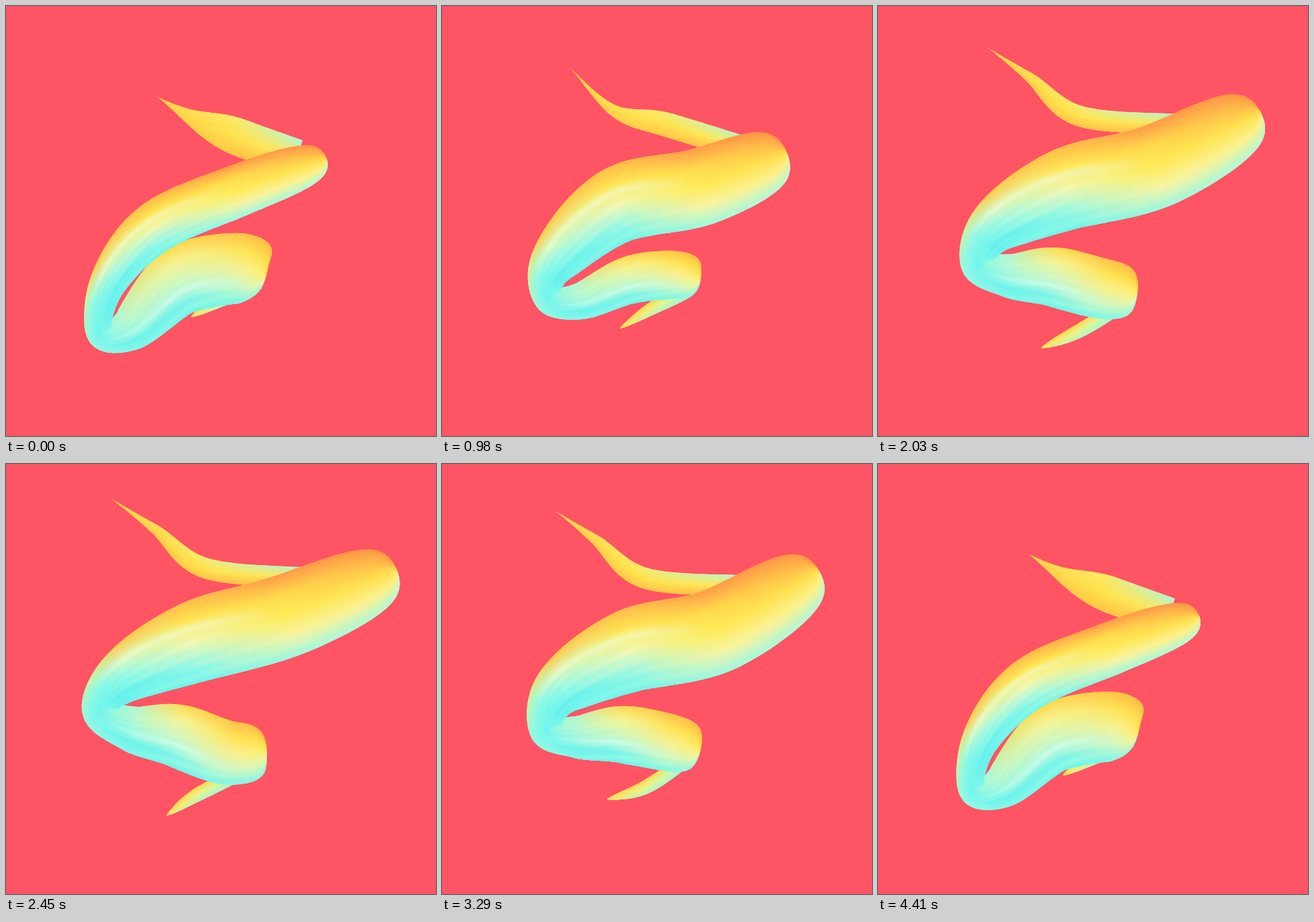
These frames come from a looping animation (600 px wide and 600 px high, 4.48 s). An HTML page with a canvas:

```html
<!DOCTYPE html>
<html lang="en">
<head>
<meta charset="utf-8">
<title>Paint ribbon</title>
<style>
html, body { margin: 0; width: 100%; height: 100%; overflow: hidden; background: #ff5464; }
canvas { display: block; width: 600px; height: 600px; }
</style>
</head>
<body>
<canvas id="stage" width="600" height="600"></canvas>
<script>
const ctx = document.getElementById('stage').getContext('2d');
const LOOP = 4480, STEP = 70, NU = 72, NV = 28;

// Time in ms -> position along the four poses
const TIMING = [[0, 0], [980, 1], [1610, 2], [2870, 3], [2940, 3],
  [3360, 1.92], [3640, 1.06], [4410, .03], [4480, 0]];

// Spine points x,y. The band runs from the blade's end round the bend
// (middle point) to the body's end. wide: half widths of blade and body.
const POSES = [
  { band: [363,376, 322,366, 243,384, 172,452, 130,456, 143,385, 208,309, 325,257, 447,212],
    upper: [210,126, 262,157, 322,182, 405,212], lower: [258,434, 300,410, 355,388], wide: [50, 37] },
  { band: [361,380, 320,375, 260,383, 192,412, 148,407, 158,355, 245,278, 362,252, 481,204],
    upper: [178,85, 240,146, 315,166, 425,200], lower: [248,450, 300,418, 350,396], wide: [34, 55] },
  { band: [360,399, 312,385, 250,377, 190,383, 147,375, 165,318, 262,263, 385,235, 522,148],
    upper: [158,67, 215,108, 285,162, 430,172], lower: [231,464, 287,449, 350,405], wide: [40, 60] },
  { band: [366,402, 305,411, 232,380, 168,363, 122,328, 163,286, 264,241, 400,198, 556,145],
    upper: [137,36, 205,83, 275,137, 410,152], lower: [220,504, 260,466, 345,432], wide: [48, 58] }
];

const mix = (a, b, k) => a + (b - a) * k;
const blend = (a, b, k) => a.map((n, i) => mix(n, b[i], k));
const rgb = hex => [0, 2, 4].map(i => parseInt(hex.slice(i, i + 2), 16));
const smooth = x => { const t = Math.min(1, x); return t * t * (3 - 2 * t); };

// A limb swells away from the bend and closes with a round cap
const limb = (u, full, pose) =>
  mix(18 + 2.3 * pose, full, smooth(u / .6)) * Math.sqrt(Math.max(0, 1 - u ** 12));

// Colour stops: [u, colours from the upper edge to the lower one]
// Glints: [u from, u to, v from, v to, width, strength, colour]
const ribbons = [
  { spine: 'upper', from: 0, to: 1,
    width: (u, p) => (14 + 12 * Math.exp(-1.4 * p)) * smooth(u / .7),
    stops: [
      [0, 'ffd24c ffd24c ffd24c'],
      [.6, 'ffea66 ffe24e ffc846'],
      [1, 'a8f6dc ffe860 ffb846']],
    glints: [] },
  { spine: 'lower', from: 0, to: 1,
    width: u => 10 * Math.sin(Math.PI * .8 * u),
    stops: [
      [0, 'ffdc54 ffe25a ffe868'],
      [.5, 'ffd850 e8f68c b4f8c4'],
      [1, 'ffe668 b8f8c8 94f7dc']],
    glints: [] },
  { spine: 'band', from: .5, to: 0,
    width: (u, p, wide) => limb(u, wide[0], p),
    stops: [
      [0, '8cf8e6 80f8ea 70f4ec 84f8ea 9cf8e0'],
      [.25, 'b0f8d0 b8f8d0 a0f8e0 78f6ea 7cf7ea'],
      [.5, 'ffdc50 f4f498 d0f8c0 a4f9e2 74f6ea'],
      [.8, 'ffc048 ffe452 faf090 d4f8c0 80f7e8'],
      [1, 'ffb848 ffdc4c ffee68 e8f6a8 94f8e0']],
    glints: [
      [.1, .8, .55, .7, .05, .6, 'd8fdf4'],
      [.05, .7, .78, .82, .05, .5, '5cecf0']] },
  { spine: 'band', from: .49, to: 1,
    width: (u, p, wide) => limb(u, wide[1], p),
    stops: [
      [0, '9cf8e0 84f8ea 70f4ec 80f8ea 8cf8e6'],
      [.18, 'd0f49c 94f9e6 7cf7ea 70f3ec 66f0ec'],
      [.3, 'ffcc4a d8f8c0 a0f9e4 7cf7ea 74f5ec'],
      [.5, 'ffc248 ffe854 f0f8b8 a0f8e2 78f6ea'],
      [.75, 'ff9c48 ffdc4c ffec58 f8f4a4 a0f8e0'],
      [1, 'ff9448 ffb048 ffdc4c fff080 bcf8d4']],
    glints: [
      [.15, .72, .2, .4, .06, .65, 'f0fcd4'],
      [.05, .5, .75, .8, .06, .5, '58ecf0']] }
];

function pieceAt(keys, x) {
  let i = 0;
  while (i < keys.length - 2 && x > keys[i + 1][0]) i++;
  return [keys[i][1], keys[i + 1][1], (x - keys[i][0]) / (keys[i + 1][0] - keys[i][0])];
}

function rampAt(ramp, v) {
  const x = v * (ramp.length - 1), i = Math.min(Math.floor(x), ramp.length - 2);
  return blend(ramp[i], ramp[i + 1], x - i);
}

function shade({ stops, glints }, u, v) {
  const [a, b, k] = pieceAt(stops, u);
  let c = blend(rampAt(a, v), rampAt(b, v), k);
  // fine brush lines, only where the paint is cool
  const cool = Math.max(0, (c[2] - 150) / 90);
  c[0] += 11 * cool * Math.sin(v * 46 + u * 7) * Math.sin(u * Math.PI);
  for (const [u0, u1, v0, v1, width, power, tint] of glints) {
    const s = (u - u0) / (u1 - u0);
    if (s <= 0 || s >= 1) continue;
    const d = (v - mix(v0, v1, s)) / width;
    c = blend(c, tint, power * Math.sin(Math.PI * s) * Math.exp(-d * d));
  }
  return `rgb(${c.map(n => Math.round(Math.min(255, n)))})`;
}

// samples crowd towards the far end, where the cap curves
const along = i => 1 - (1 - i / NU) ** 1.6;

for (const r of ribbons) {
  r.stops = r.stops.map(([u, list]) => [u, list.split(' ').map(rgb)]);
  r.glints = r.glints.map(g => [...g.slice(0, 6), rgb(g[6])]);
  r.paint = [];
  for (let i = 0; i < NU; i++)
    for (let j = 0; j < NV; j++)
      r.paint.push(shade(r, along(i + .5), (j + .5) / NV));
}

// Catmull-Rom point on a flat x,y list
function curve(pts, u) {
  const last = pts.length / 2 - 1;
  const i = Math.min(Math.floor(u * last), last - 1), t = u * last - i;
  const at = (n, axis) => pts[2 * Math.max(0, Math.min(last, n)) + axis];
  return [0, 1].map(axis => {
    const [a, b, c, d] = [-1, 0, 1, 2].map(n => at(i + n, axis));
    return b + t / 2 * (c - a + t * (2 * a - 5 * b + 4 * c - d + t * (3 * (b - c) + d - a)));
  });
}

function drawRibbon({ spine, from, to, width, paint }, pose) {
  const n = Math.min(Math.floor(pose), POSES.length - 2);
  const now = part => blend(POSES[n][part], POSES[n + 1][part], pose - n);
  const pts = now(spine), wide = now('wide');
  const at = u => curve(pts, mix(from, to, Math.max(0, Math.min(1, u))));
  const grid = [];
  for (let i = 0; i <= NU; i++) {
    const u = along(i), [x, y] = at(u);
    const [x0, y0] = at(u - .01), [x1, y1] = at(u + .01);
    const k = width(u, pose, wide) / Math.hypot(x1 - x0, y1 - y0);
    const nx = (y1 - y0) * k, ny = (x0 - x1) * k;
    grid.push(Array.from({ length: NV + 1 }, (_, j) => {
      const side = 1 - 2 * j / NV;
      return [x + nx * side, y + ny * side];
    }));
  }
  // cells reach into the next ones so that no seams show
  for (let i = 0; i < NU; i++) {
    const i2 = Math.min(i + 2, NU);
    for (let j = 0; j < NV; j++) {
      const j2 = Math.min(j + 2, NV);
      ctx.fillStyle = paint[i * NV + j];
      ctx.beginPath();
      for (const [a, b] of [[i, j], [i + 1, j], [i2, j], [i2, j2], [i + 1, j2], [i, j2]])
        ctx.lineTo(...grid[a][b]);
      ctx.fill();
    }
  }
}

let shown = -1;
function tick() {
  const t = Math.floor(performance.now() % LOOP / STEP) * STEP;
  if (t !== shown) {
    shown = t;
    const pose = mix(...pieceAt(TIMING, t));
    ctx.fillStyle = '#ff5464';
    ctx.fillRect(0, 0, 600, 600);
    for (const r of ribbons) drawRibbon(r, pose);
  }
  requestAnimationFrame(tick);
}
tick();
</script>
</body>
</html>
```
